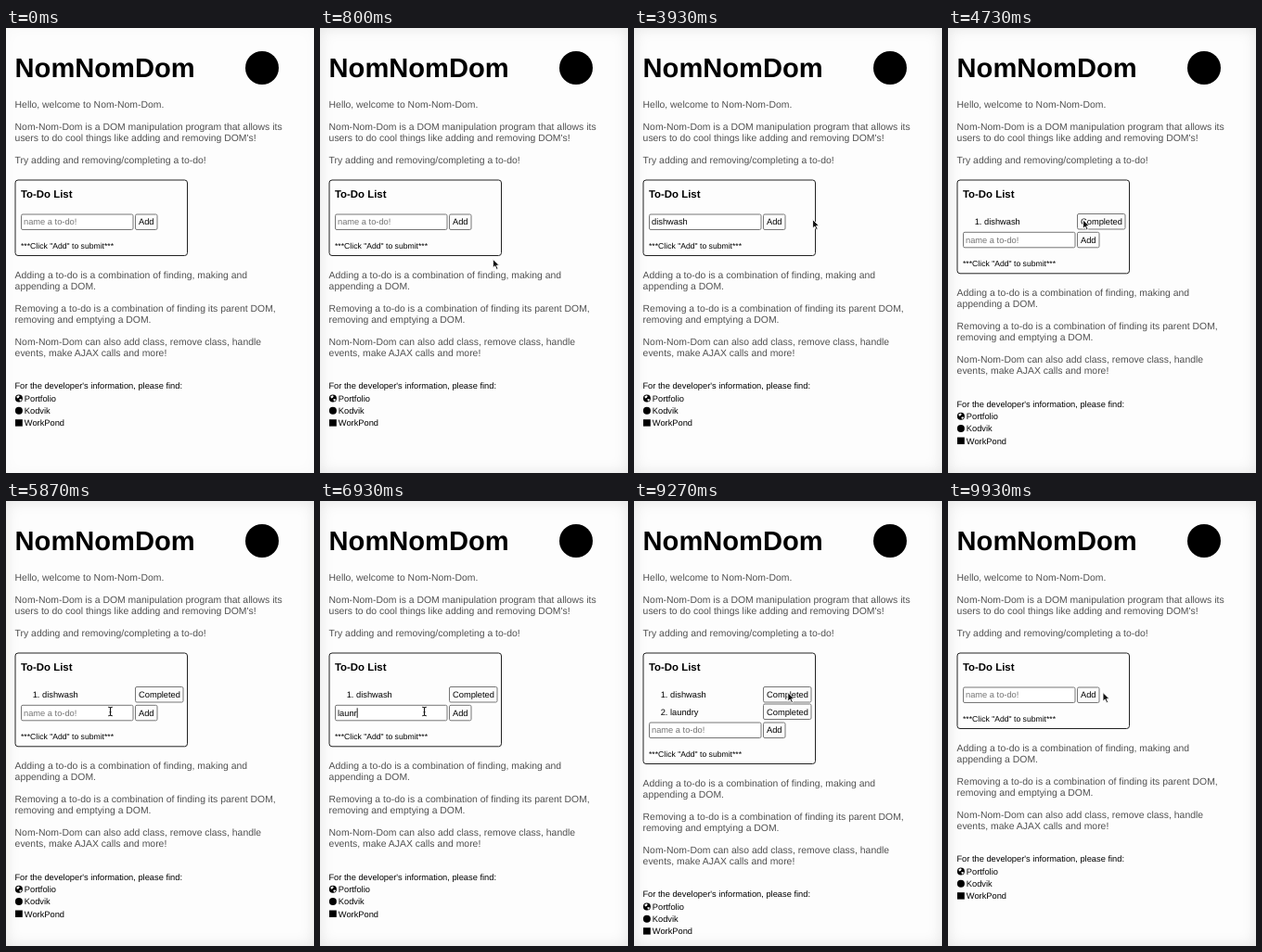
An HTML page for the animation above (9990 ms loop, 332x480 px).

```html
<!DOCTYPE html>
<html lang="en">
<head>
<meta charset="utf-8">
<title>NomNomDom</title>
<style>
  html, body { margin: 0; width: 100%; height: 100%; overflow: hidden; background: #fdfdfd; }
  svg { display: block; width: 332px; height: 480px; text-rendering: geometricPrecision;
        font: 9.3px "Liberation Sans", Arial, sans-serif; }
  text { white-space: pre; }
  .prose { font-size: 10.42px; fill: #505050; }
  .field { fill: #fff; stroke: #767676; }
  .button { fill: #fcfcfc; stroke: #767676; }
  #shade { position: fixed; left: 0; top: 0; width: 332px; height: 480px;
           box-shadow: inset 0 0 16px rgba(0, 0, 0, .1); }
</style>
</head>
<body>
<svg viewBox="0 0 332 480">
  <text x="9.6" y="53" font-size="29.1" font-weight="bold">NomNomDom</text>
  <circle cx="276" cy="43" r="18"/>
  <g class="prose">
    <text x="9.6" y="86">Hello, welcome to Nom-Nom-Dom.</text>
    <text x="9.6" y="110">Nom-Nom-Dom is a DOM manipulation program that allows its</text>
    <text x="9.6" y="122">users to do cool things like adding and removing DOM's!</text>
    <text x="9.6" y="146.4">Try adding and removing/completing a to-do!</text>
  </g>

  <rect id="card" x="10" y="164" width="185.5" height="81.5" rx="3" fill="none" stroke="#222"/>
  <text x="16" y="183" font-size="11.4" font-weight="bold">To-Do List</text>
  <g class="item">
    <text x="28.7" y="212"></text>
    <rect class="button" x="139.5" y="200.5" width="51.5" height="16.5" rx="1.5"/>
    <text x="143" y="212">Completed</text>
  </g>
  <g class="item" transform="translate(0 18.5)">
    <text x="28.7" y="212"></text>
    <rect class="button" x="139.5" y="200.5" width="51.5" height="16.5" rx="1.5"/>
    <text x="143" y="212">Completed</text>
  </g>

  <g id="below">
    <rect class="field" x="16.5" y="201" width="120.5" height="16.5" rx="1.5"/>
    <text id="entry" x="19" y="212.4"></text>
    <rect id="caret" y="204" width="0.9" height="10.5"/>
    <rect class="button" x="139.5" y="201" width="23.5" height="16.5" rx="1.5"/>
    <text x="143" y="212.4">Add</text>
    <text x="16" y="237.6" font-size="8.63">***Click "Add" to submit***</text>
    <g class="prose">
      <text x="9.6" y="269.7">Adding a to-do is a combination of finding, making and</text>
      <text x="9.6" y="281.7">appending a DOM.</text>
      <text x="9.6" y="306">Removing a to-do is a combination of finding its parent DOM,</text>
      <text x="9.6" y="318">removing and emptying a DOM.</text>
      <text x="9.6" y="342">Nom-Nom-Dom can also add class, remove class, handle</text>
      <text x="9.6" y="354">events, make AJAX calls and more!</text>
    </g>
    <text x="9.4" y="389.3">For the developer's information, please find:</text>
    <circle cx="13.9" cy="399.5" r="4"/>
    <path d="M11.2 397.8l2-1.6 1.6.8-1 1.8-1.5.6zM14.2 400.6l2-.6.8 1.2-1.8 1.6z" fill="#fff"/>
    <text x="19.8" y="402.7">Portfolio</text>
    <circle cx="13.9" cy="412.8" r="4"/>
    <text x="19.8" y="416">Kodvik</text>
    <rect x="10" y="422.2" width="7.8" height="7.4"/>
    <text x="19.8" y="429.4">WorkPond</text>
  </g>

  <g id="pointer">
    <path id="arrow" d="M0 0V9.6L2.3 7.5 3.9 11.2 5.6 10.5 4 6.9H7z" fill="#111" stroke="#fff" stroke-width=".9"/>
    <path id="beam" d="M-2.3-4.8Q0-4.8 0-3.6Q0-4.8 2.3-4.8M0-3.6V3.6M-2.3 4.8Q0 4.8 0 3.6Q0 4.8 2.3 4.8M-1 .8H1"
          fill="none" stroke="#111" stroke-width="1.1"/>
  </g>
</svg>
<div id="shade"></div>

<script>
const LOOP = 9990, ROW = 19.3;
const $ = id => document.getElementById(id);
const items = [...document.querySelectorAll(".item")];

// [time, value]: each value holds until the next time
const typed = [[0, ""], [2200, "d"], [2330, "di"], [2470, "dis"], [2540, "dish"], [2670, "dishw"],
  [2730, "dishwa"], [2870, "dishwas"], [2930, "dishwash"], [4530, ""], [6070, "l"], [6270, "la"],
  [6400, "lau"], [6600, "laun"], [6930, "launr"], [7270, "laun"], [7400, "laund"], [7470, "laundr"],
  [7530, "laundry"], [8730, ""]];
const todos = [[0, []], [4530, ["dishwash"]], [8730, ["dishwash", "laundry"]],
  [9370, ["laundry"]], [9800, []]];
const focus = [[1470, 4470], [5330, 8670]];

// [time, x, y] of the pointer's hot spot
const track = [[400, 296, 299], [700, 216, 262], [1000, 128, 224], [1330, 67, 209], [1470, 66, 209],
  [1530, 65.5, 209], [1730, 64.5, 208.5], [3670, 64.5, 208.5], [3730, 85, 208.5], [3870, 165, 207],
  [3930, 192.5, 206.5], [4000, 196.5, 206.5], [4330, 149, 207], [4470, 147, 207], [4730, 145.5, 206.8],
  [4870, 145.5, 206.8], [5100, 128, 221], [5330, 112.5, 227], [8270, 112.5, 227], [8330, 113, 227],
  [8470, 116, 227], [8670, 149, 227], [8800, 149, 227], [9200, 165.8, 206.5], [9730, 166, 206.5],
  [9930, 167, 206.5], [LOOP, 167, 206.5]];

const latest = (steps, t) => steps.filter(s => s[0] <= t).pop();

function pointerAt(t) {
  const i = track.findIndex(p => p[0] > t);
  const [a, b] = [track[i - 1], track[i]];
  const k = (t - a[0]) / (b[0] - a[0]);
  return [a[1] + (b[1] - a[1]) * k, a[2] + (b[2] - a[2]) * k];
}

function show(el, on) { el.style.display = on ? "" : "none"; }

function draw(t) {
  const list = latest(todos, t)[1];
  const shift = list.length ? ROW * list.length - (list.length - 1) * .6 : 0;
  items.forEach((el, i) => {
    show(el, i < list.length);
    el.firstElementChild.textContent = `${i + 1}. ${list[i] || ""}`;
  });
  $("card").setAttribute("height", 81.5 + shift);
  $("below").setAttribute("transform", `translate(0 ${shift})`);

  const [editTime, value] = latest(typed, t);
  const entry = $("entry");
  entry.textContent = value || "name a to-do!";
  entry.setAttribute("fill", value ? "#000" : "#757575");

  const active = focus.find(([from, to]) => t >= from && t < to);
  const blink = active && (t - Math.max(editTime, active[0])) % 1060 < 530;
  show($("caret"), blink);
  $("caret").setAttribute("x", 19 + (value ? entry.getComputedTextLength() : 0));

  show($("pointer"), t >= track[0][0]);
  if (t >= track[0][0]) {
    const [x, y] = pointerAt(t);
    const overField = x > 16 && x < 137 && y > 201 + shift && y < 218 + shift;
    $("pointer").setAttribute("transform", `translate(${x} ${y})`);
    show($("beam"), overField);
    show($("arrow"), !overField);
  }
  $("shade").style.opacity = t < 70 ? .25 : t < 130 ? .7 : 1;
}

const start = performance.now();
function tick() {
  draw((performance.now() - start) % LOOP);
  requestAnimationFrame(tick);
}
tick();
</script>
</body>
</html>
```
